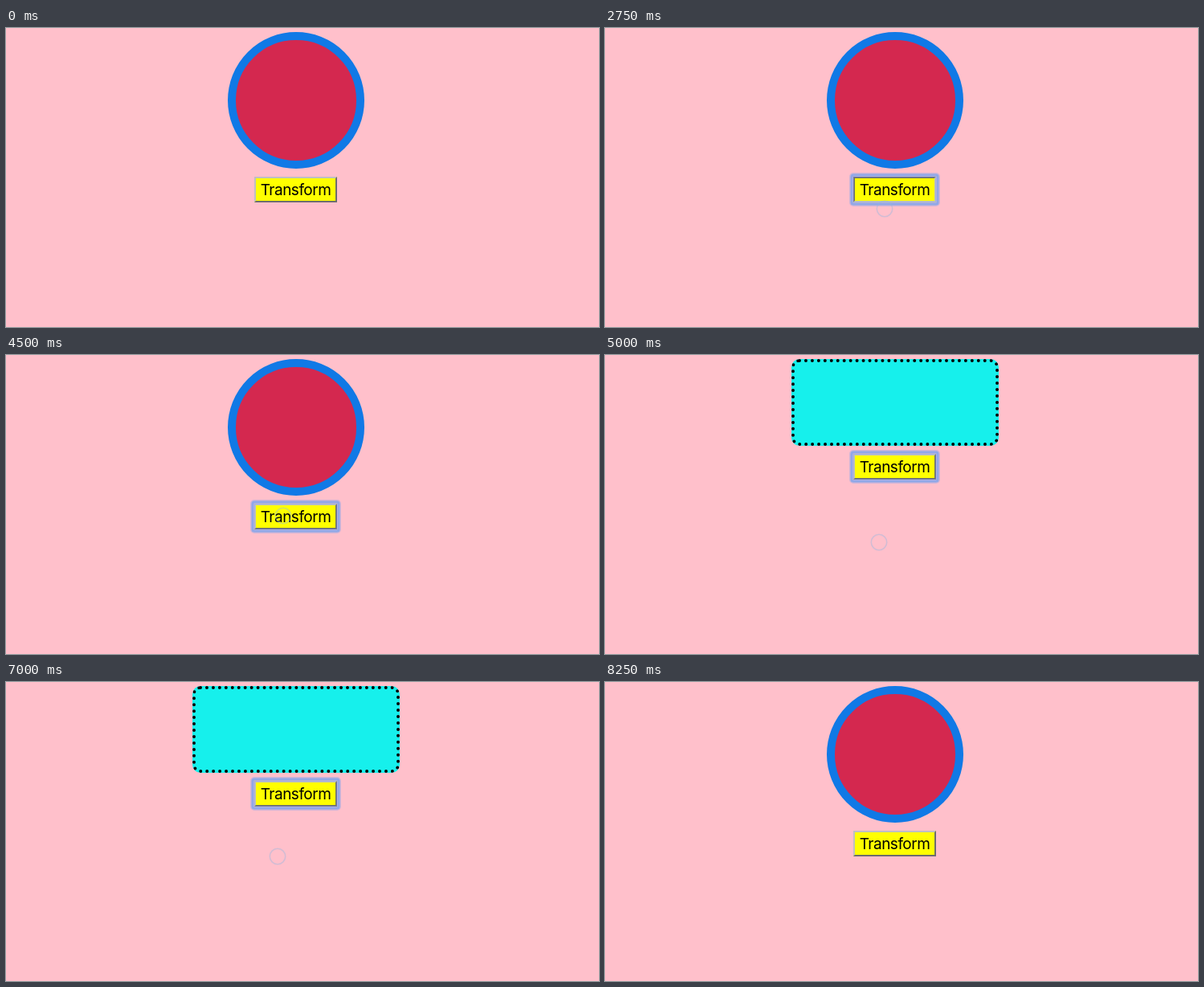
Write an HTML page that moves like this. It is 738 by 372 pixels and loops after 9 s.

```html
<!DOCTYPE html>
<html lang="en">
<head>
<meta charset="utf-8">
<title>Transform</title>
<style>
  html, body { margin: 0; width: 100%; height: 100%; overflow: hidden; background: #ffc0cb; }
  #shape {
    position: absolute; top: 5px; left: 276px; width: 170px; height: 170px;
    box-sizing: border-box; border: 10px solid #1079e6; border-radius: 50%; background: #d4284f;
  }
  #shape.card {
    left: 232px; width: 258px; height: 108px;
    border: 4px dotted #000; border-radius: 10px; background: #16f0ec;
  }
  svg { position: absolute; top: 0; left: 0; }
  text { font: 19px Inter, sans-serif; letter-spacing: -.5px; text-anchor: middle; }
</style>
</head>
<body>
<div id="shape"></div>
<svg width="738" height="372">
  <g id="button">
    <rect x="309" y="185" width="103" height="32" fill="#ff0"/>
    <path id="topLeft" d="M309 217V185H412L410 187H311V215Z"/>
    <path id="bottomRight" d="M309 217H412V185L410 187V215H311Z"/>
    <g id="focus" fill="none" stroke="#7ba3ee">
      <rect x="307" y="183" width="107" height="36" rx="2" stroke-width="6" opacity=".35"/>
      <rect x="307" y="183" width="107" height="36" rx="2" stroke-width="3" opacity=".75"/>
    </g>
    <text x="360.5" y="208">Transform</text>
  </g>
  <circle id="pointer" r="9.7" fill="none" stroke="#94b8e0" stroke-opacity=".42" stroke-width="1.6"/>
</svg>
<script>
const LOOP = 9000, STEP = 250;
const [shape, button, topLeft, bottomRight, focusRing, pointer] =
  ["shape", "button", "topLeft", "bottomRight", "focus", "pointer"]
    .map(id => document.getElementById(id));

// The pointer enters, then clicks at each following stop: time, x, y
const stops = [
  [750, 510, 159], [1750, 348, 233], [3000, 348, 225], [4250, 349, 167],
  [5000, 341, 233], [6000, 336, 167], [7000, 338, 217], [8000, 336, 162]
];

const show = (element, on) => element.setAttribute("visibility", on ? "visible" : "hidden");
const mix = (a, b, u) => a + (b - a) * u;

function draw(now) {
  const t = Math.floor(now % LOOP / STEP) * STEP;
  const passed = stops.filter(stop => stop[0] <= t).length;
  const active = passed > 0 && t < 8250;
  const isCard = passed > 2 && passed % 2 === 1;

  // The pointer reaches each stop one step early and presses there.
  const [t0, x0, y0] = stops[Math.max(passed - 1, 0)];
  const [t1, x1, y1] = stops[passed] || stops.at(-1);
  const pressed = active && t === t1 - STEP;
  const u = Math.min(1, Math.max(0, (t - t0) / Math.max(STEP, t1 - STEP - t0)));
  const eased = u * u * (3 - 2 * u);

  shape.className = isCard ? "card" : "";
  button.setAttribute("transform", `translate(0 ${isCard ? -62 : 0})`);
  topLeft.setAttribute("fill", pressed ? "#6d6d6d" : "#c0c0c0");
  bottomRight.setAttribute("fill", pressed ? "#c0c0c0" : "#6d6d6d");
  show(focusRing, active && (pressed || passed > 1));
  show(pointer, active);
  pointer.setAttribute("cx", mix(x0, x1, eased));
  pointer.setAttribute("cy", mix(y0, y1, eased));
}

const start = performance.now();
function tick() {
  draw(performance.now() - start);
  requestAnimationFrame(tick);
}
tick();
</script>
</body>
</html>
```
